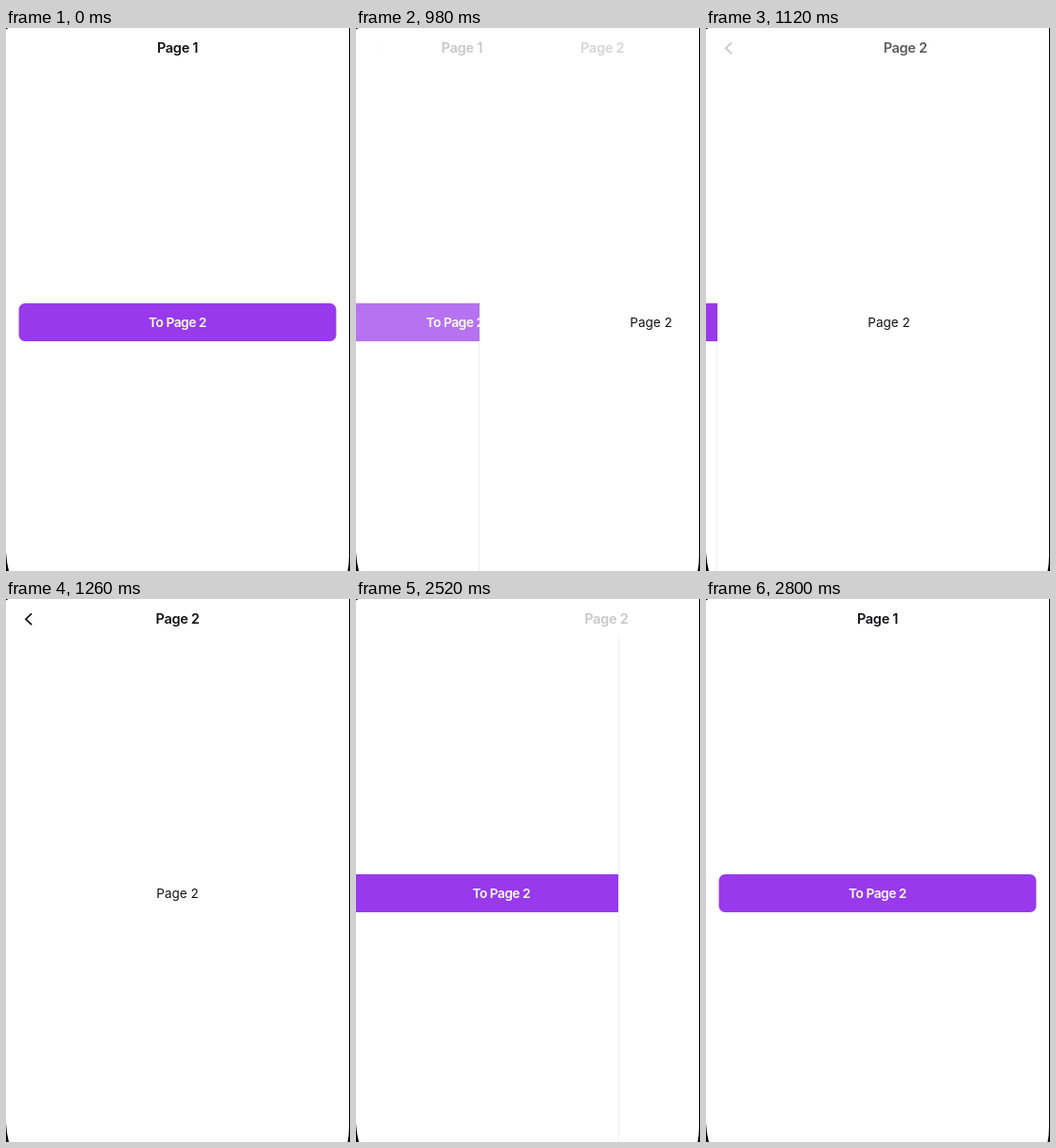
Recreate the animation shown at these times as an HTML page. Size 362 px wide and 572 px high, loop 3430 ms.

```html
<!DOCTYPE html>
<html lang="en">
<head>
<meta charset="utf-8">
<title>Page transition</title>
<style>
  html, body { margin: 0; width: 100%; height: 100%; overflow: hidden; background: #fff; }
  svg { display: block; }
  text { font-family: Inter, Roboto, "Liberation Sans", sans-serif; text-anchor: middle; fill: #121214; }
  .title { font-size: 14.5px; font-weight: 600; letter-spacing: -.3px; }
  .label { font-size: 13.7px; font-weight: 600; letter-spacing: -.45px; fill: #fff; }
  .body { font-size: 13.5px; }
</style>
</head>
<body>
<svg width="362" height="572" viewBox="0 0 362 572">
  <rect width="362" height="572" fill="#fff"/>
  <g id="page1">
    <rect id="button" x="13.5" y="290" width="334" height="40" rx="6.5" fill="#9839ec"/>
    <text class="label" x="180.5" y="314.5">To Page 2</text>
  </g>
  <g id="page2">
    <rect y="40" width="362" height="532" fill="#fff"/>
    <rect id="edge" x="-1" width="1" fill="#f0f0f0"/>
    <text class="body" x="180.5" y="314.5">Page 2</text>
  </g>
  <text id="title1" class="title" x="180.5" y="26">Page 1</text>
  <text id="title2" class="title" x="180.5" y="26">Page 2</text>
  <path id="back" d="M27 15.3L20.8 21.2L27 27.1" fill="none" stroke="#121214" stroke-width="1.7"/>
  <!-- device bezel -->
  <path d="M0 0H2.5L0 1.5ZM0 552Q.6 563 3 572H0ZM361 0H362V572H359.5Q361 565 361 556Z"/>
</svg>
<script>
const LOOP = 3430, STEP = 70, WIDTH = 361;
const PRESS = 490, PUSH = 910, PUSH_END = 1260, POP = 2520, POP_END = 2800;
const $ = id => document.getElementById(id);
const clamp = v => Math.min(1, Math.max(0, v));
const smooth = v => v * v * (3 - 2 * v);

// Share of the way left for a critically damped spring
const springLeft = ms => {
  const k = 22 * ms / 1000;
  return (1 + k) * Math.exp(-k);
};

function place(id, x, alpha = 1) {
  $(id).setAttribute("transform", `translate(${x} 0)`);
  $(id).setAttribute("opacity", clamp(alpha));
}

function draw(t) {
  const pushing = t >= PUSH && t < PUSH_END;
  const popping = t >= POP && t < POP_END;
  let shown = t >= PUSH_END && t < POP ? 1 : 0;   // how far page 2 is in
  let title1 = [0, 1 - shown], title2 = [0, shown], backAlpha = shown;

  if (pushing) {
    const u = clamp((t - 880) / 380), s = smooth(u);
    shown = 1 - springLeft(t - 881);
    title1 = [-108 * shown, 1 - 1.2 * shown];
    title2 = [95 * (1 - s), s];
    backAlpha = u ** 3;
  } else if (popping) {
    const s = smooth((t - POP) / (POP_END - POP));
    shown = springLeft(t - 2393);
    title1 = [-95 * (1 - s), s];
    title2 = [108 * (1 - shown), shown];
    backAlpha = 0;
  }

  place("page1", -WIDTH * shown * .33);
  place("page2", Math.round(WIDTH * (1 - shown)), shown > 0 ? 1 : 0);
  place("title1", ...title1);
  place("title2", ...title2);
  place("back", 0, backAlpha);

  const top = pushing ? 330 : 40;
  $("edge").setAttribute("y", top);
  $("edge").setAttribute("height", 572 - top);

  const fade = t < PRESS ? 1 : .42 + .58 * smooth(clamp((t - 880) / 200));
  $("button").setAttribute("opacity", fade);
}

const start = performance.now();
function tick() {
  const t = (performance.now() - start) % LOOP;
  draw(Math.floor(t / STEP) * STEP);
  requestAnimationFrame(tick);
}
tick();
</script>
</body>
</html>
```
